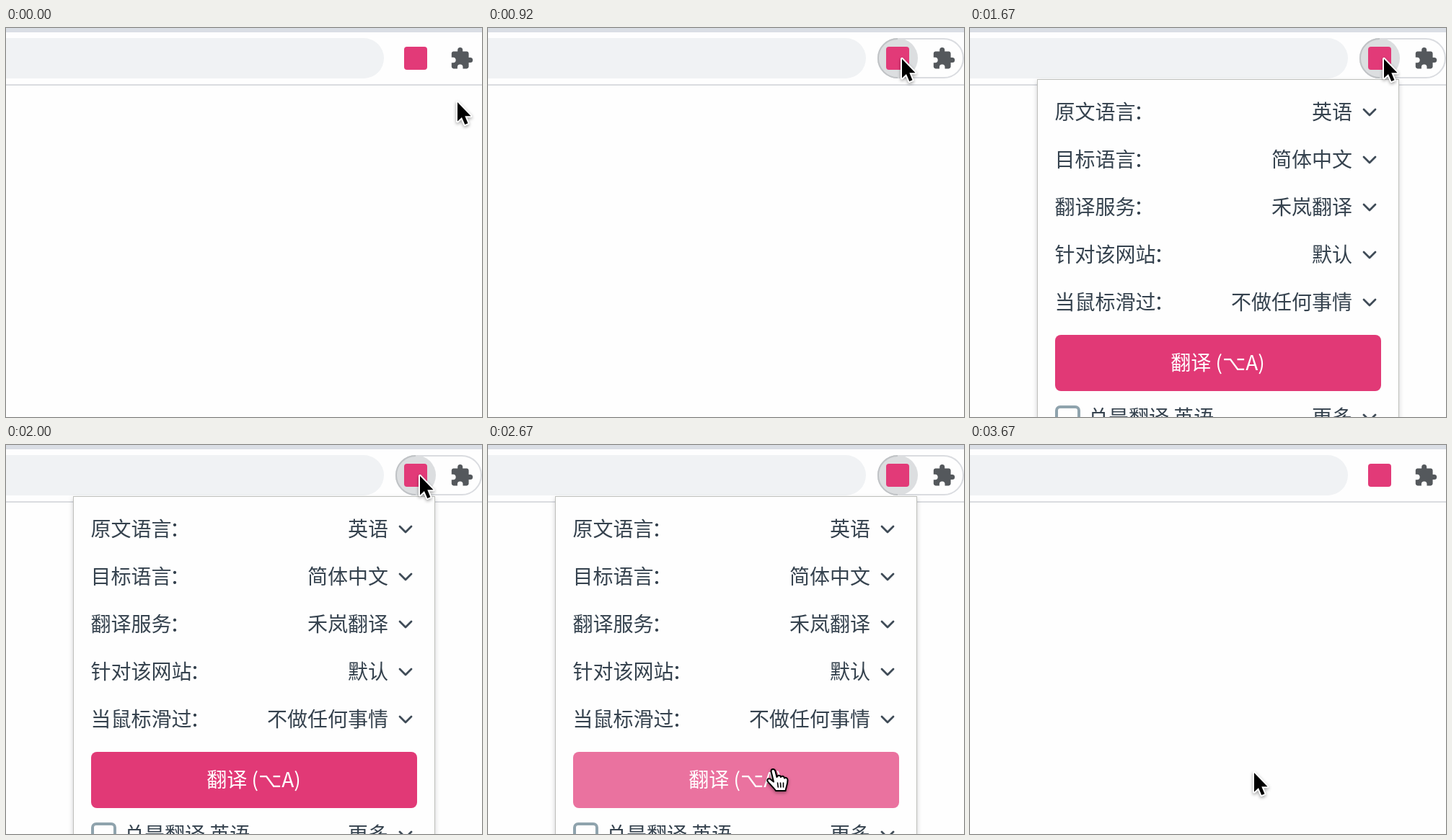
Recreate the animation shown at these times as an HTML page. Size 660x540 px, loop 3.76 s.

```html
<!DOCTYPE html>
<html lang="zh-CN">
<head>
<meta charset="utf-8">
<style>
  html, body { margin: 0; width: 100%; height: 100%; overflow: hidden; background: #fefefe; }
  svg { display: block; width: 660px; height: 540px; }
  text { font: 500 28px "Noto Sans CJK SC", "Noto Sans CJK", "Noto Sans", sans-serif; fill: #35424e; }
  .end { text-anchor: end; }
  .chevron { fill: none; stroke: #3f4b57; stroke-width: 2.8; stroke-linecap: round; stroke-linejoin: round; }
  #popup { filter: drop-shadow(0 3px 3px rgba(60, 60, 70, .25)); }
  #arrow, #hand { filter: drop-shadow(0 2px 2px rgba(0, 0, 0, .35)); }
</style>
</head>
<body>
<svg viewBox="0 0 660 540">
  <rect width="660" height="540" fill="#fefefe"/>
  <rect width="660" height="6" fill="#dadee5"/>
  <rect x="-40" y="14" width="564" height="56" rx="28" fill="#f0f2f4"/>
  <rect y="78" width="660" height="2" fill="#dadce0"/>

  <g id="pill">
    <rect x="541" y="15" width="118" height="54" rx="27" fill="none" stroke="#dadce0" stroke-width="2"/>
    <g id="ripple">
      <circle cx="568" cy="42" r="28" fill="#dcdee0"/>
      <path d="M568 15a27 27 0 0 0 0 54" fill="none" stroke="#c0c3c6" stroke-width="2"/>
    </g>
  </g>
  <rect x="552" y="26" width="32" height="32" rx="4" fill="#e23a78"/>
  <path transform="translate(615 25.6) scale(1.4)" fill="#54585c" d="M20.5 11H19V7c0-1.1-.9-2-2-2h-4V3.5a2.5 2.5 0 0 0-5 0V5H4c-1.1 0-2 .9-2 2v3.8h1.5a2.7 2.7 0 0 1 0 5.4H2V20c0 1.1.9 2 2 2h3.8v-1.5a2.7 2.7 0 0 1 5.4 0V22H17c1.1 0 2-.9 2-2v-4h1.5a2.5 2.5 0 0 0 0-5z"/>

  <g id="popup">
    <rect id="panel" x="93.5" y="71.5" width="501" height="51" fill="#fefefe" stroke="#bfc0bc"/>
  </g>
  <g id="content">
    <g id="rows"></g>
    <rect id="button" x="118" y="426" width="452" height="78" rx="8"/>
    <text x="343.5" y="475" text-anchor="middle" style="fill:#fff">翻译 (⌥A)</text>
    <rect x="120" y="526" width="31" height="31" rx="5" fill="none" stroke="#8fa3ad" stroke-width="4"/>
  </g>

  <path id="arrow" d="M0 0V26.5L6 21L10.3 31L14.5 29.2L10.3 19.3H18.5Z" fill="#000" stroke="#fff" stroke-width="4" paint-order="stroke" stroke-linejoin="round"/>
  <g id="hand" stroke="#000" stroke-width="2" stroke-linecap="round" stroke-linejoin="round">
    <path fill="#fff" d="M7 4C7 0 12 0 13 4L15 12C16 9 20 9 20.5 12C21.5 10 25 10 25.5 13.5C27 12 30 13 30 16C30 22 28 25 27 31H13.5C11 27 5 22 2 17.5C1 14 5 13 7.5 16L10.5 18.5Z"/>
    <path d="M16 20l.8 6M20 20l.4 6M24 20v6" stroke-width="1.6"/>
  </g>
</svg>
<script>
const $ = id => document.getElementById(id);
const LOOP = 3760, STEP = LOOP / 45;

const rows = [
  ["原文语言：", "英语"],
  ["目标语言：", "简体中文"],
  ["翻译服务：", "禾岚翻译"],
  ["针对该网站：", "默认"],
  ["当鼠标滑过：", "不做任何事情"],
  ["总是翻译 英语", "更多"]
];
$("rows").innerHTML = rows.map(([label, value], i) => {
  const last = i === 5, y = last ? 551 : 127 + 66 * i;
  return `<text x="${last ? 164 : 117.5}" y="${y}">${label.replace("：", '<tspan dx="-2.5">：</tspan>')}</text>
    <text class="end" x="530" y="${y}">${value}</text>
    <path class="chevron" d="M546 ${y - 14}l8 8l8-8"/>`;
}).join("");

// Pointer stops: time, x, y
const path = [
  [80, 626, 103], [750, 574, 43],
  [2005, 574, 43], [2430, 400, 451],
  [2507, 400, 451], [2670, 394, 455]
];

function pointer(t) {
  const next = path.findIndex(p => p[0] > t);
  if (next < 0) return path.at(-1).slice(1);
  if (next === 0) return path[0].slice(1);
  const [t0, x0, y0] = path[next - 1], [t1, x1, y1] = path[next];
  const u = (t - t0) / (t1 - t0), e = u * u * (3 - 2 * u);
  return [x0 + (x1 - x0) * e, y0 + (y1 - y0) * e];
}

const show = (id, on) => $(id).style.display = on ? "" : "none";

function draw(now) {
  const t = Math.floor((now % LOOP + 8) / STEP) % 45 * STEP;
  const [x, y] = pointer(t);
  const closed = t >= 2840;
  const open = t >= 1660 && !closed;
  const over = open && y > 426;
  const pressed = over && t >= 2580;

  show("pill", y < 76 || t > 1000 && !closed);
  show("ripple", x < 596 && !closed);
  show("popup", t >= 1500 && !closed);
  show("content", open);
  show("hand", over);
  show("arrow", !over);
  $("panel").setAttribute("height", open ? 520 : 51);
  $("button").setAttribute("fill", pressed ? "#ea729f" : over ? "#e6417e" : "#e13976");
  $("arrow").setAttribute("transform", `translate(${x} ${y})`);
  $("hand").setAttribute("transform", `translate(${x - 8.5} ${y - 6})`);
}

const start = performance.now();
function tick() {
  draw(performance.now() - start);
  requestAnimationFrame(tick);
}
tick();
</script>
</body>
</html>
```
